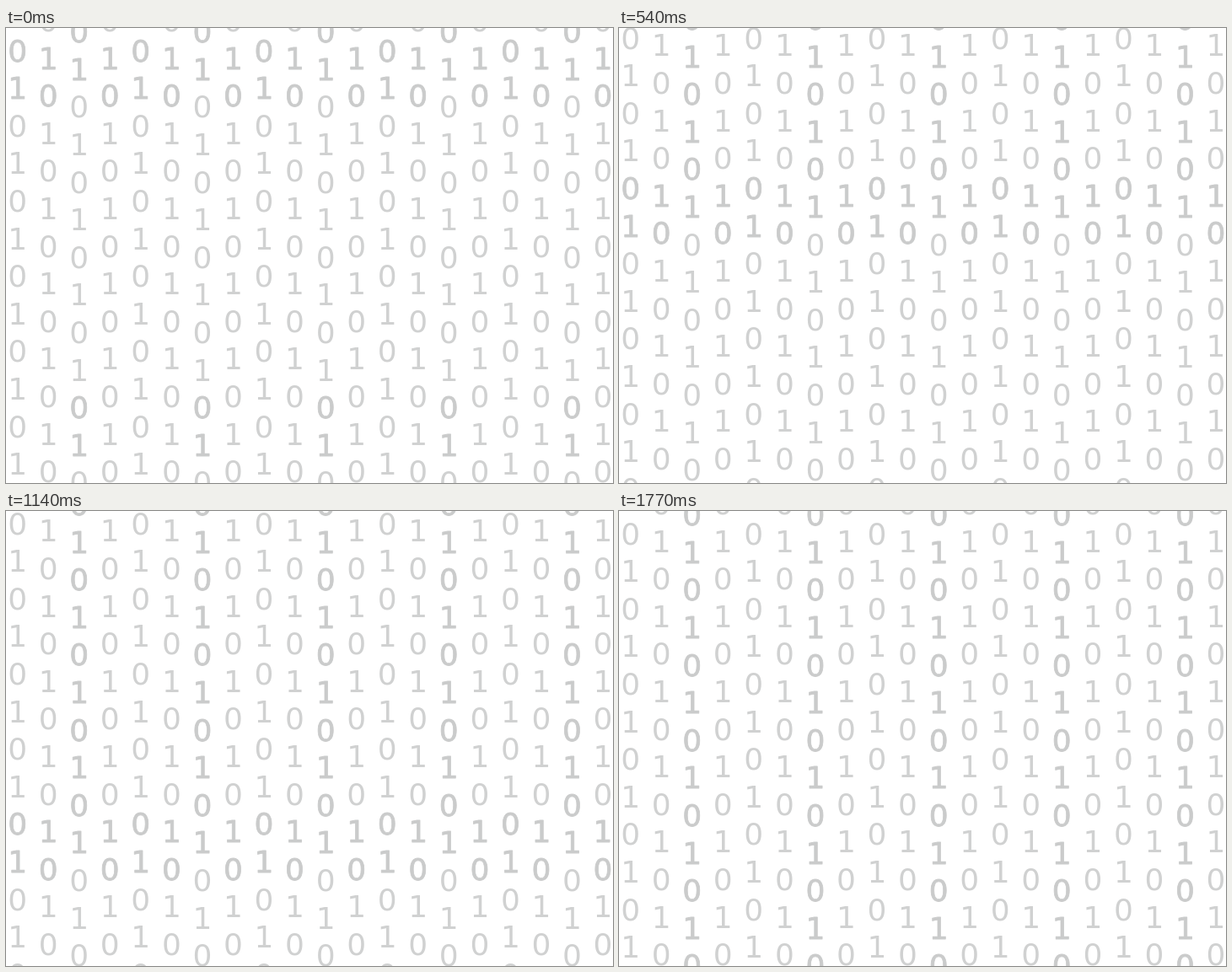
An HTML page with a canvas that plays this animation: 720 by 540 pixels, repeating every 1.8 s.

```html
<!DOCTYPE html>
<html lang="en">
<head>
<meta charset="utf-8">
<title>Binary rain</title>
<style>
  html, body { margin: 0; height: 100%; overflow: hidden; background: #fff; }
  canvas { display: block; }
</style>
</head>
<body>
<canvas id="stage" width="720" height="540"></canvas>
<script>
const ctx = document.getElementById('stage').getContext('2d');
const STEP = 30, STEPS = 60;      // ms per step, steps per loop
const PITCH = 44.6;               // distance between digits
const TRAVEL = 12 * PITCH;        // fall during one loop
const SIZE = 36;

// Start height of digit 0 and the rule for heavy digits, by column kind
const SIDE = { y: 80, heavy: k => k === -1 || k === 0 };
const KINDS = [
  { y: 26.5, heavy: k => k === 0 || k === 1 },
  SIDE,
  { y: 4, heavy: k => k <= 1 || k === 10 || k === 11 },
  SIDE
];

function drawDigit(text, x, y, heavy) {
  const left = x - SIZE * 0.318, base = y + SIZE * 0.3645;
  ctx.fillStyle = ctx.strokeStyle = heavy ? '#cacbcb' : '#d0d1d1';
  ctx.fillText(text, left, base);
  if (heavy) ctx.strokeText(text, left, base);
}

function drawColumn(col, shift) {
  const { y, heavy } = KINDS[col % 4];
  const x = 13.6 + col * 36.55;
  const first = Math.floor((-20 - y - shift) / PITCH);
  for (let k = first; ; k++) {
    const cy = y + shift + k * PITCH;
    if (cy > 560) break;
    drawDigit(k % 2 ? '1' : '0', x, cy, heavy(k));
  }
}

function frame() {
  const step = Math.floor(performance.now() / STEP) % STEPS;
  const shift = TRAVEL * step / (STEPS - 1);
  ctx.fillStyle = '#fff';
  ctx.fillRect(0, 0, 720, 540);
  ctx.font = SIZE + 'px "DejaVu Sans", sans-serif';
  ctx.lineWidth = 0.8;
  ctx.lineJoin = 'round';
  for (let col = 0; col < 20; col++) drawColumn(col, shift);
  requestAnimationFrame(frame);
}
frame();
</script>
</body>
</html>
```
